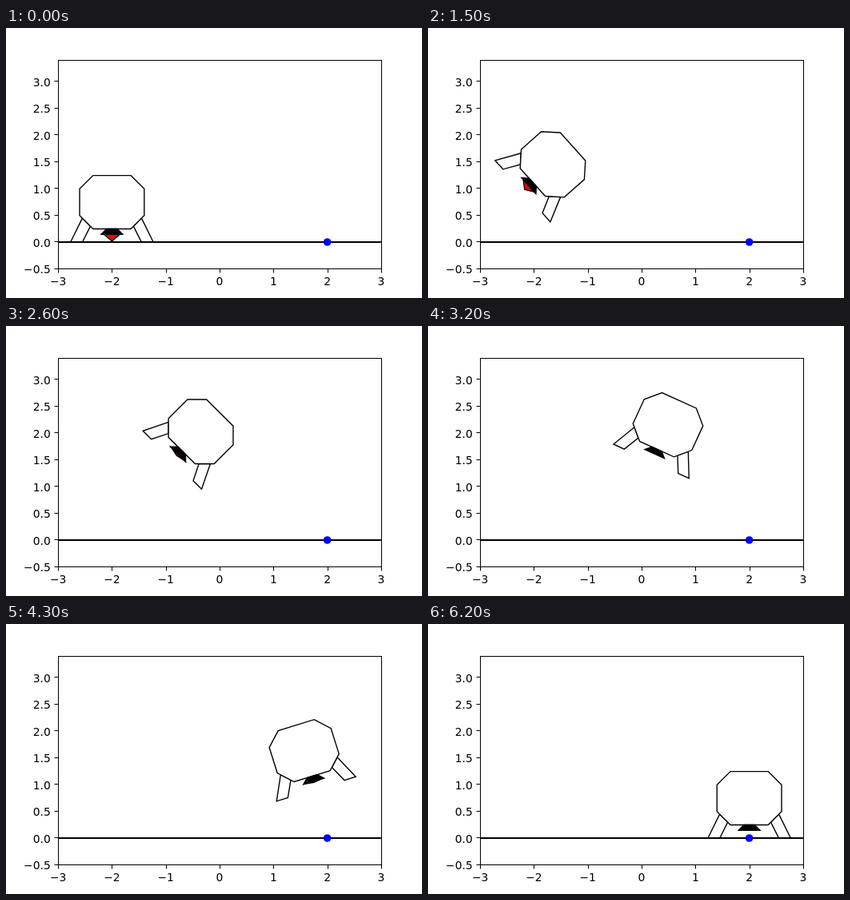
Write an HTML page with a canvas that moves like this. It is 520 px wide and 338 px high and loops after 7.9 s.

```html
<!DOCTYPE html>
<html lang="en">
<head>
<meta charset="utf-8">
<title>Lander flight</title>
<style>
  html, body { margin: 0; width: 100%; height: 100%; overflow: hidden; background: #fff; }
  canvas { display: block; }
</style>
</head>
<body>
<canvas id="stage" width="520" height="338"></canvas>
<script>
const ctx = document.getElementById('stage').getContext('2d');
const LOOP = 7900, STEP = 100, LAST_STEP = 62;
const AXES = { left: 65.12, right: 468.9, top: 40.68, bottom: 301.71 };
const SX = (AXES.right - AXES.left) / 6, SY = (AXES.bottom - AXES.top) / 3.9;
const px = x => AXES.left + (x + 3) * SX;
const py = y => AXES.bottom - (y + 0.5) * SY;
const snapX = x => Math.round(x) + 0.5;
const snapY = y => Math.round(y) - 0.5;

// Key poses: seconds, centre x, centre y, clockwise tilt in degrees
const POSES = [
  [0, -2, 0.75, 0],
  [1.5, -1.65, 1.456, 48.2],
  [2.6, -0.349, 2.032, 45],
  [3.2, 0.49, 2.16, 24.5],
  [3.8, 1.126, 1.998, 0],
  [4.3, 1.57, 1.638, -17.3],
  [5.3, 1.976, 0.979, -17],
  [6.2, 2, 0.75, 0]
];

// Parts relative to the centre of the body; left halves are mirrored
const mirror = points => points.map(([x, y]) => [-x, y]);
const symmetric = half => [...half, ...mirror(half).reverse()];
const BODY = symmetric([[0.35, 0.5], [0.6, 0.25], [0.6, -0.25], [0.35, -0.5]]);
const NOZZLE = symmetric([[0.1, -0.5], [0.2, -0.6]]);
const LEG = [[0.55, -0.3], [0.77, -0.75], [0.55, -0.75], [0.4, -0.45]];

// Thrust fades out on the climb and builds up again for the landing
function flameLength(t) {
  if (t >= LAST_STEP * STEP / 1000) return 0;
  return t < 3.5 ? Math.min(0.13, 0.06 * Math.max(0, 3.2 - t)) : 0.04 * Math.max(0, t - 3.8);
}

// Tangent of the curve through the key poses; at rest at both ends
function slope(i, col) {
  const p = POSES[i - 1], q = POSES[i], r = POSES[i + 1];
  if (!p || !r) return 0;
  const h0 = q[0] - p[0], h1 = r[0] - q[0];
  return ((q[col] - p[col]) / h0 * h1 + (r[col] - q[col]) / h1 * h0) / (h0 + h1);
}

function pose(t) {
  let i = 0;
  while (i < POSES.length - 2 && t >= POSES[i + 1][0]) i++;
  const a = POSES[i], b = POSES[i + 1];
  const h = b[0] - a[0], u = (t - a[0]) / h, v = 1 - u;
  return [1, 2, 3].map(col =>
    v * v * (1 + 2 * u) * a[col] + u * u * (3 - 2 * u) * b[col] +
    h * u * v * (v * slope(i, col) - u * slope(i + 1, col)));
}

function line(x0, y0, x1, y1, width) {
  ctx.lineWidth = width;
  ctx.beginPath();
  ctx.moveTo(x0, y0);
  ctx.lineTo(x1, y1);
  ctx.stroke();
}

function drawLander(t) {
  const [x, y, degrees] = pose(t);
  const c = Math.cos(degrees * Math.PI / 180), s = Math.sin(degrees * Math.PI / 180);
  const polygon = (points, fill) => {
    ctx.beginPath();
    for (const [a, b] of points) ctx.lineTo(px(x + a * c + b * s), py(y - a * s + b * c));
    ctx.closePath();
    ctx.fillStyle = fill;
    ctx.fill();
    ctx.stroke();
  };
  ctx.lineWidth = 1.39;
  polygon(LEG, '#fff');
  polygon(mirror(LEG), '#fff');
  polygon(BODY, '#fff');
  const flame = flameLength(t);
  if (flame > 0.001) polygon([[-0.15, -0.6], [0.15, -0.6], [0, -0.6 - flame]], '#f00');
  polygon(NOZZLE, '#000');
}

function drawAxes() {
  const left = snapX(AXES.left), right = snapX(AXES.right);
  const top = snapY(AXES.top), bottom = snapY(AXES.bottom);
  ctx.lineWidth = 1;
  ctx.strokeRect(left, top, right - left, bottom - top);
  ctx.fillStyle = '#000';
  ctx.font = "13.89px 'DejaVu Sans', sans-serif";
  const label = (v, digits) => v.toFixed(digits).replace('-', '\u2212');
  ctx.textAlign = 'center';
  for (let v = -3; v <= 3; v++) {
    const x = snapX(px(v));
    line(x, bottom, x, bottom + 5, 1);
    ctx.fillText(label(v, 0), px(v), 322);
  }
  ctx.textAlign = 'right';
  for (let v = -0.5; v <= 3; v += 0.5) {
    const y = snapY(py(v));
    line(left - 5, y, left, y, 1);
    ctx.fillText(label(v, 1), 55.8, Math.round(py(v) + 5.4));
  }
}

function draw(now) {
  const step = Math.min(Math.floor(now % LOOP / STEP), LAST_STEP);
  ctx.fillStyle = '#fff';
  ctx.fillRect(0, 0, 520, 338);
  ctx.strokeStyle = '#000';
  ctx.save();
  ctx.beginPath();
  ctx.rect(AXES.left, AXES.top, AXES.right - AXES.left, AXES.bottom - AXES.top);
  ctx.clip();
  drawLander(step * STEP / 1000);
  const ground = Math.round(py(0));
  line(AXES.left, ground, AXES.right, ground, 2);
  ctx.fillStyle = '#00f';
  ctx.beginPath();
  ctx.arc(px(2), ground, 4.8, 0, 2 * Math.PI);
  ctx.fill();
  ctx.restore();
  drawAxes();
}

let start;
function tick(now) {
  start ??= now;
  draw(now - start);
  requestAnimationFrame(tick);
}
draw(0);
requestAnimationFrame(tick);
</script>
</body>
</html>
```
